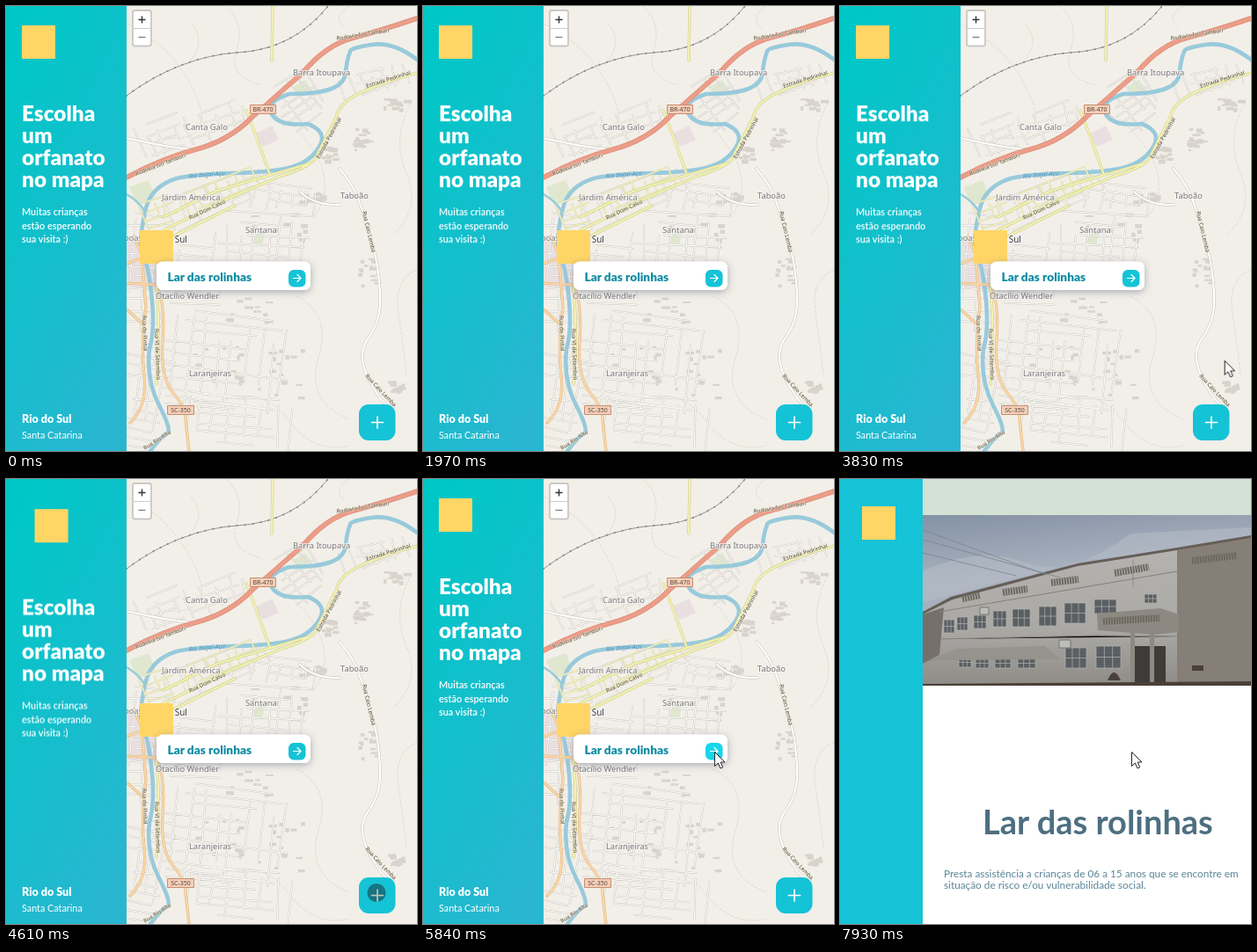
Write an HTML page that moves like this. It is 467 px wide and 506 px high and loops after 8000 ms.

```html
<!DOCTYPE html>
<html lang="pt-BR">
<head>
<meta charset="utf-8">
<title>Mapa</title>
<style>
html, body { margin: 0; width: 100%; height: 100%; overflow: hidden; }
svg { position: absolute; left: 0; top: 0; width: 467px; height: 506px; font-family: Lato, sans-serif; }
.area { font: 9.3px "Noto Sans", sans-serif; fill: #77767a; stroke: #f6f4f0; stroke-width: 1.6; paint-order: stroke; }
.road { font: 500 6.3px "Noto Sans", sans-serif; fill: #4b4338; stroke: #f5f0dc; stroke-width: .8; paint-order: stroke; }
.line { fill: none; stroke-linejoin: round; stroke-linecap: round; }
.title { font-weight: 900; font-size: 24.4px; }
.small { font-weight: 600; font-size: 10.9px; }
</style>
</head>
<body>
<svg viewBox="0 0 467 506">
  <defs>
    <linearGradient id="side" x1=".75" y1="1" x2=".25" y2="0">
      <stop stop-color="#29b6d1"/><stop offset="1" stop-color="#00c7c7"/>
    </linearGradient>
    <linearGradient id="sky" x2=".2" y2="1">
      <stop stop-color="#8492a5"/><stop offset=".4" stop-color="#a9b2bf"/><stop offset="1" stop-color="#a4aab1"/>
    </linearGradient>
    <linearGradient id="wall" x2="0" y2="1">
      <stop stop-color="#b5b3af"/><stop offset=".6" stop-color="#aaa8a4"/><stop offset="1" stop-color="#8f8c87"/>
    </linearGradient>
    <filter id="shadow" x="-20%" y="-50%" width="140%" height="220%">
      <feDropShadow dx="0" dy="2" stdDeviation="4" flood-color="#456" flood-opacity=".45"/>
    </filter>
    <clipPath id="mapArea"><path d="M137 0H467V506H137z"/></clipPath>
    <clipPath id="photoArea"><path d="M94 41H467V235H94z"/></clipPath>
  </defs>

  <g id="home">
    <g clip-path="url(#mapArea)">
      <path fill="#f2efe9" d="M137 0H467V506H137z"/>
      <path fill="#dfe8cf" d="M140 206l22-8 8 18-20 12zM326 92l14-8 8 12-14 8zM280 258l14 2-3 12-12-2z"/>
      <path fill="#eadfe0" d="M137 262h34v60h-34zM282 146l20-10 8 16-18 8z"/>
      <path class="line" stroke="#dbd5cb" stroke-width=".8" stroke-dasharray="3 2" d="M250 0Q272 20 262 50T290 90M137 20Q190 45 215 100T180 150M390 0Q370 12 385 25M460 110Q438 150 455 190T440 260M467 300Q440 310 446 350T455 420M330 330Q370 350 355 400T390 470M240 450Q290 430 320 470T390 500M210 20Q230 40 205 68M320 130Q385 190 350 240"/>
      <g id="blocks" fill="#d8d3cc"></g>
      <g id="streets" class="line"></g>

      <g class="line">
        <g stroke="#98cadb">
          <path stroke-width="4.600" d="M467 61Q440 40 415 44T391 52Q387 62 386 75T370 94T322 100Q294 109 302 123T343 134Q366 143 356 160T325 183T260 190T194 196Q165 205 159 230T153 270Q163 300 166 335T163 390Q159 425 174 454T183 486T164 506"/>
          <path stroke-width="2.500" d="M137 214Q151 222 158 234"/>
        </g>
        <path stroke="#8a8a8a" stroke-width=".9" d="M137 102Q168 79 200 67T262 53Q326 50 366 0"/>
        <path stroke="#8a8a8a" stroke-width="2" stroke-dasharray=".1 9" d="M137 102Q168 79 200 67T262 53Q326 50 366 0"/>
        <path id="lane" d="M379 185Q397 205 405 233T418 278T425 326T412 377T414 428T440 456M334 211Q350 227 380 226M137 150Q180 160 210 163"/>
        <g id="orange"></g>
        <g id="yellow"></g>
        <path stroke="#d98874" stroke-width="5.600" d="M137 195Q178 173 216 163T280 126L338 75Q364 44 395 36T467 14"/>
        <path stroke="#ec9d88" stroke-width="4.400" d="M137 195Q178 173 216 163T280 126L338 75Q364 44 395 36T467 14"/>
      </g>

      <g font-family="Noto Sans, sans-serif" font-size="7" font-weight="500" text-anchor="middle" fill="#5c4537">
        <path fill="#f4cfb9" stroke="#c98e72" d="M277.500 112.500h29v10h-29zM183.500 454.500h30v10h-30z"/>
        <text x="292" y="120">BR-470</text><text x="198.500" y="462">SC-350</text>
      </g>
      <g id="labels"></g>
      <text x="183" y="269" font-family="Noto Sans, sans-serif" font-size="10" fill="#333" stroke="#fff" stroke-width="1.500" paint-order="stroke">o Sul</text>

      <g>
        <rect x="144" y="5" width="21" height="40.500" rx="2.500" fill="#fff" stroke="#cbc8c3" stroke-width="1.800"/>
        <path stroke="#ccc" d="M145 25.500h19"/>
        <path stroke="#333" stroke-width="1.400" d="M150.500 15.500h8M154.500 11.500v8"/>
        <path stroke="#777" stroke-width="1.200" d="M150.500 35.500h8"/>
      </g>
      <path fill="#ffd666" d="M152 255h38v38h-38z"/>
      <rect x="171" y="290.500" width="175" height="32.500" rx="7" fill="#fff" filter="url(#shadow)"/>
      <text x="183.500" y="313" font-size="13.700" font-weight="900" fill="#0e8ca4">Lar das rolinhas</text>
      <rect id="go" x="321" y="300" width="19.500" height="19.500" rx="6" fill="#15c3d6"/>
      <path class="line" stroke="#fff" stroke-width="1.200" d="M326.500 309.500h8.500m-4-4l4 4-4 4"/>
      <rect x="401" y="453" width="41.500" height="41" rx="11" fill="#15c3d6"/>
      <path class="line" stroke="#fff" stroke-width="1.700" d="M415.500 473.500h13M422 467v13"/>
      <g id="press">
        <circle cx="421" cy="470.500" r="10.500" fill="#174b54" opacity=".65"/>
        <path class="line" stroke="#b9c7b4" stroke-width="1.500" d="M415.500 473.500h13M422 467v13"/>
      </g>
    </g>

    <path fill="url(#side)" d="M0 0H137V506H0z"/>
    <path id="badge" fill="#ffd666" d="M18 22h38v38h-38z"/>
    <g id="intro" fill="#fff">
      <g class="title"><text x="18" y="130.500">Escolha</text><text x="18" y="155.700">um</text><text x="18" y="181">orfanato</text><text x="18" y="206.300">no mapa</text></g>
      <g class="small"><text x="18" y="238">Muitas crianças</text><text x="18" y="253.500">estão esperando</text><text x="18" y="269">sua visita :)</text></g>
    </g>
    <g fill="#fff"><text x="18" y="474" font-size="12.600" font-weight="900">Rio do Sul</text><text x="18" y="492" font-size="10.800">Santa Catarina</text></g>
  </g>

  <g id="detail">
    <path fill="#d3e2d5" d="M0 0H467V506H0z"/>
    <path id="scrollbar" fill="#9dafa0" d="M464 0h2.500v247h-2.500z"/>
    <g id="page">
      <path fill="#fff" d="M94 235H467V506H94z"/>
      <g clip-path="url(#photoArea)">
        <path fill="url(#sky)" d="M94 41H467V235H94z"/>
        <path fill="#b9c0c9" opacity=".5" d="M94 105Q160 75 210 95T330 62L467 55V75L280 92 94 140z"/>
        <path fill="url(#wall)" d="M94 151L126 134 270 96 383 79V235H94z"/>
        <path fill="#867f77" d="M383 81L467 65V235H383z"/>
        <path fill="#655e58" d="M94 151L126 134 270 96 383 78 467 64V67L383 81 270 99 128 137 94 154z"/>
        <path fill="#77706a" d="M94 154L118 146 113 200 94 210z"/>
        <g id="windows" stroke="#b2b2ae" stroke-width=".7"></g>
        <path stroke="#85817a" stroke-width="1.200" d="M114 182L293 178 383 179M113 151L383 105"/>
        <path fill="#96928c" d="M100 207L133 193 233 190 250 205 130 206z"/>
        <path fill="#3f3b38" d="M334 190h36v42h-36z"/>
        <path fill="#8d8982" d="M292 153L364 147 385 154V174L357 177 293 172zM330 175h5v57h-5zM352 175h5v57h-5z"/>
        <path stroke="#6d6861" stroke-width="8" stroke-dasharray="2 1" fill="none" d="M299 162L363 158M400 93L451 87M312 107L351 100M240 118L271 114M185 129L213 125M139 136L159 132"/>
        <path fill="#494039" d="M400 212h13v6h-13zM94 233L467 230V235H94zM304 229q7-18 15 0z"/>
        <path class="line" stroke="#7d858e" stroke-width=".8" d="M94 58L232 108M94 69L250 112M94 84L200 110M333 92V122"/>
        <path fill="#bdbdb9" stroke="#77736d" d="M159 146h10v8h-10zM249 183h13v9h-13z"/>
      </g>
      <text id="heading" x="162" y="404" font-size="38" font-weight="700" fill="#4d6f80">Lar das rolinhas</text>
      <g font-size="11.800" fill="#5c8599">
        <text x="118" y="453">Presta assistência a crianças de 06 a 15 anos que se encontre em</text>
        <text x="118" y="466">situação de risco e/ou vulnerabilidade social.</text>
      </g>
    </g>
    <g id="rail"><path fill="#17c3d6" d="M-4 0H96V506H-4z"/><path fill="#ffd666" d="M27 31h38v38h-38z"/></g>
  </g>

  <path id="cursor" fill="#fff" stroke="#222" stroke-width="1" d="M.5.5V16.500L4.300 13 7 19 9.700 17.800 7.200 12H12z"/>
</svg>
<script>
const LOOP = 8000;
const $ = id => document.getElementById(id);
const add = (id, html) => $(id).insertAdjacentHTML('beforeend', html);
let seed = 41;
const rand = () => (seed = seed * 16807 % 2147483647) / 2147483647;
const spread = (a, b) => a + rand() * (b - a);

const cased = (id, d, edge, fill, width) =>
  add(id, `<path d="${d}" stroke="${edge}" stroke-width="${width + 1}"/><path d="${d}" stroke="${fill}" stroke-width="${width}"/>`);

// Each district is a slightly irregular street grid: x, y, width, height, tilt.
function district(x, y, w, h, tilt) {
  const a = tilt * Math.PI / 180;
  const at = (u, v) => `${(x + u * Math.cos(a) - v * Math.sin(a)).toFixed(1)} ${(y + u * Math.sin(a) + v * Math.cos(a)).toFixed(1)}`;
  let d = '';
  for (let v = 0; v < h; v += spread(8, 15)) d += `M${at(spread(0, w / 3), v)}L${at(spread(w * .6, w), v + spread(-3, 3))}`;
  for (let u = 0; u < w; u += spread(10, 20)) d += `M${at(u, spread(0, h / 3))}L${at(u + spread(-4, 4), spread(h * .6, h))}`;
  return d;
}
const minor = [
  [180, 222, 125, 38, -23], [240, 232, 115, 85, 4], [178, 342, 155, 112, 7], [137, 235, 50, 135, 3],
  [137, 385, 58, 115, 8], [290, 102, 65, 65, -35], [200, 130, 75, 36, -20], [378, 85, 75, 28, -18],
  [285, 200, 80, 30, 8], [180, 270, 70, 70, 5], [210, 440, 120, 55, 5], [145, 140, 60, 40, -20]
].map(area => district(...area)).join('');
cased('streets', minor, '#cdc8c1', '#fdfdfb', 1);

const clusters = [[390, 137, 22, 28], [400, 286, 20, 32], [330, 211, 30, 14], [355, 160, 18, 18], [428, 105, 24, 12],
  [210, 375, 55, 65], [285, 390, 60, 55], [250, 330, 60, 35], [275, 235, 65, 40], [430, 425, 20, 14]];
for (const [x, y, w, h] of clusters)
  for (let i = 0; i < 14; i++)
    add('blocks', `<rect x="${x + rand() * w}" y="${y + rand() * h}" width="${spread(3, 10)}" height="${spread(2, 5)}"/>`);

const lane = $('lane').getAttribute('d');
$('lane').remove();
cased('streets', lane, '#c4c0ba', '#fff', 2.2);
cased('yellow', district(150, 226, 40, 32, -20) + district(200, 215, 95, 26, -24), '#d9d9ae', '#f5f3c0', 1);
cased('yellow', 'M467 76Q430 86 404 98T375 127L350 176Q336 187 310 194L246 222 179 255M273 119L286 153 300 192M179 240L240 210 345 179M192 261L260 227M171 320Q176 375 171 430M303 0L302 62', '#c9c995', '#f4f2ad', 2.2);
cased('orange', 'M137 293Q157 285 185 276M137 315L171 317M155 294L159 342Q153 385 157 420T141 474M171 317Q181 338 178 380T190 440T204 470L208 506M145 262L158 290M137 345L157 363', '#ddb687', '#fad7a5', 2.2);

const labels = [
  ['area', 326, 79, 0, 'Barra Itoupava'], ['area', 204, 141, 0, 'Canta Galo'], ['area', 177, 221, 0, 'Jardim América'],
  ['area', 380, 219, 0, 'Taboão'], ['area', 272, 258, 0, 'Santana'], ['area', 170, 333, 0, 'Otacílio Wendler'],
  ['area', 208, 421, 0, 'Laranjeiras'], ['area', 134, 267, 0, 'boas'],
  ['road', 148, 193, -21, 'Rodovia Ivo Tamburi'], ['road', 376, 39, -9, 'Rodovia Ivo Tamburi'],
  ['road', 410, 93, -17, 'Estrada Pedrinhal'], ['road', 356, 174, -61, 'Estrada Pedrinhal'],
  ['road', 209, 243, -25, 'Rua Dom Calvo'], ['road', 405, 234, 77, 'Rua Caio Lemba'], ['road', 408, 421, 47, 'Rua Caio Lemba'],
  ['road', 169, 367, 88, 'Rua VI de Setembro'], ['road', 155, 352, 88, 'Rua do Pinhal'], ['road', 158, 505, -33, 'Rua Rio Alto']
];
for (const [kind, x, y, turn, text] of labels)
  add('labels', `<text class="${kind}" transform="translate(${x} ${y}) rotate(${turn})">${text}</text>`);
add('labels', '<text transform="translate(208 196) rotate(-5)" font-family="Noto Sans, sans-serif" font-size="7" font-style="italic" fill="#4f91b8">Rio Itajaí-Açu</text>');

const panes = [[118, 160, 12, 15], [133, 157, 12, 15], [152, 155, 14, 15], [174, 150, 15, 18], [196, 148, 20, 20], [226, 145, 20, 22],
  [255, 141, 24, 23], [289, 137, 25, 16], [346, 131, 14, 10], [135, 203, 14, 11], [154, 204, 15, 11], [176, 204, 18, 11],
  [202, 204, 20, 11], [256, 192, 24, 23], [291, 190, 28, 25]];
for (const [x, y, w, h] of panes)
  add('windows', `<path fill="#5a5f64" d="M${x} ${y}h${w}v${h}h${-w}zM${x + w / 3} ${y}v${h}M${x + w * 2 / 3} ${y}v${h}M${x} ${y + h / 2}h${w}"/>`);

// Steps are [ms, properties, easing towards the next step].
function play(id, steps) {
  const frames = steps.map(([ms, props, easing = 'linear']) => ({ offset: ms / LOOP, easing, ...props }));
  frames.push({ ...frames.at(-1), offset: 1 });
  $(id).animate(frames, { duration: LOOP, iterations: Infinity });
}
const move = (x, y) => ({ transform: `translate(${x}px, ${y}px)` });
const show = (id, ...changes) => play(id, changes.map(([ms, on]) => [ms, { opacity: on }, 'step-end']));
const bob = (id, x, y) => play(id, [0, 960, 1960, 2960, 3960, 4960, 5840]
  .map((ms, i) => [ms, i % 2 ? move(x, y) : move(0, 0), 'cubic-bezier(.25, .1, .1, 1)']));

bob('badge', 15.5, 13);
bob('intro', 0, 25);
show('home', [0, 1], [6930, 0]);
show('detail', [0, 0], [6930, 1]);
show('scrollbar', [0, 1], [7160, 0]);
show('press', [0, 0], [4150, 1], [4680, 0]);
show('cursor', [0, 0], [3400, 1], [4150, 0], [4680, 1]);
play('cursor', [[0, move(447, 397)], [3400, move(447, 397), 'ease-in-out'], [3750, move(438, 397), 'ease-in-out'],
  [4150, move(421, 466)], [4680, move(419, 458), 'ease-in'], [5450, move(377, 360), 'ease-out'], [5840, move(331, 310)]]);
play('go', [[0, { fill: '#15c3d6' }, 'step-end'], [5760, { fill: '#17d6eb' }]]);
play('page', [[0, { opacity: 0 }], [7160, { opacity: 0 }, 'ease-out'], [7900, { opacity: 1 }]]);
play('rail', [[0, move(-96, 0)], [7160, move(-96, 0), 'ease-out'], [7930, move(-2, 0)]]);
play('heading', [[0, move(150, 0)], [7160, move(150, 0), 'ease-out'], [7930, move(0, 0)]]);
</script>
</body>
</html>
```
